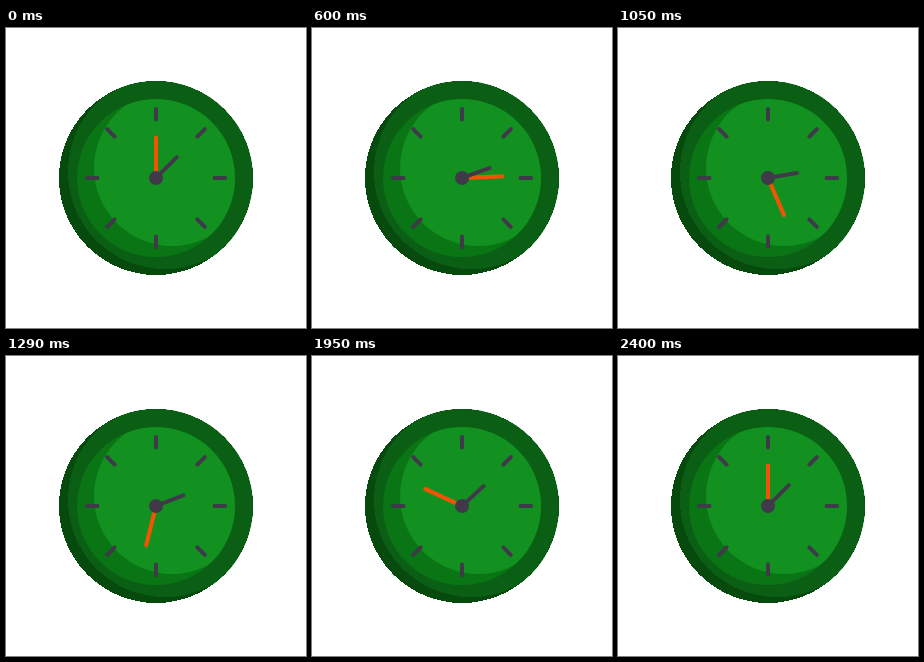
Animation, 300 px wide and 300 px high, one loop 2.49 s. Source, as an HTML page:

```html
<!DOCTYPE html>
<html lang="en">
<head>
<meta charset="utf-8">
<title>Clock</title>
<style>
  html, body { margin: 0; width: 100%; height: 100%; overflow: hidden; background: #fff; }
  svg { display: block; width: 300px; height: 300px; }
  .hand {
    transform-origin: 0 0;
    animation: 2490ms infinite paused;
    animation-delay: calc(var(--t, 0) * -1ms);
  }
  .long { animation-name: lap; }
  .short { animation-name: swing; }

  /* Both hands rest from 2400 ms to the end of the loop. */
  @keyframes lap {
    0% { transform: rotate(0deg); animation-timing-function: cubic-bezier(.345, .321, .655, .679); }
    96.386%, 100% { transform: rotate(360deg); }
  }
  @keyframes swing {
    0% { transform: rotate(45deg); animation-timing-function: cubic-bezier(.333, 0, .667, 1); }
    38.554% { transform: rotate(81.9deg); animation-timing-function: ease; }
    96.386%, 100% { transform: rotate(45deg); }
  }
</style>
</head>
<body>
<svg viewBox="0 0 300 300">
  <defs>
    <clipPath id="rim"><circle r="97"/></clipPath>
    <clipPath id="face"><circle r="79"/></clipPath>
    <path id="tick" d="M0-69V-58.5"/>
  </defs>
  <g transform="translate(150 150)">
    <circle r="97" fill="#064a0d" shape-rendering="crispEdges"/>
    <g clip-path="url(#rim)"><circle cx="9" cy="-6" r="97" fill="#0a5f15" shape-rendering="crispEdges"/></g>
    <circle r="79" fill="#0a7514"/>
    <g clip-path="url(#face)"><circle cx="16" cy="-10" r="78" fill="#129121"/></g>
    <g stroke="#3f394a" stroke-width="4" stroke-linecap="round">
      <use href="#tick"/>
      <use href="#tick" transform="rotate(45)"/>
      <use href="#tick" transform="rotate(90)"/>
      <use href="#tick" transform="rotate(135)"/>
      <use href="#tick" transform="rotate(180)"/>
      <use href="#tick" transform="rotate(225)"/>
      <use href="#tick" transform="rotate(270)"/>
      <use href="#tick" transform="rotate(315)"/>
      <path class="hand long" d="M0 0V-40.5" stroke="#f55206"/>
      <path class="hand short" d="M0 0V-29.5"/>
    </g>
    <circle r="7" fill="#3f394a"/>
  </g>
</svg>
<script>
  const STEP = 30, LOOP = 2490;

  // The hands move in discrete 30 ms steps.
  function tick(now) {
    const t = Math.floor((now % LOOP) / STEP) * STEP;
    document.documentElement.style.setProperty('--t', t);
    requestAnimationFrame(tick);
  }
  requestAnimationFrame(tick);
</script>
</body>
</html>
```
